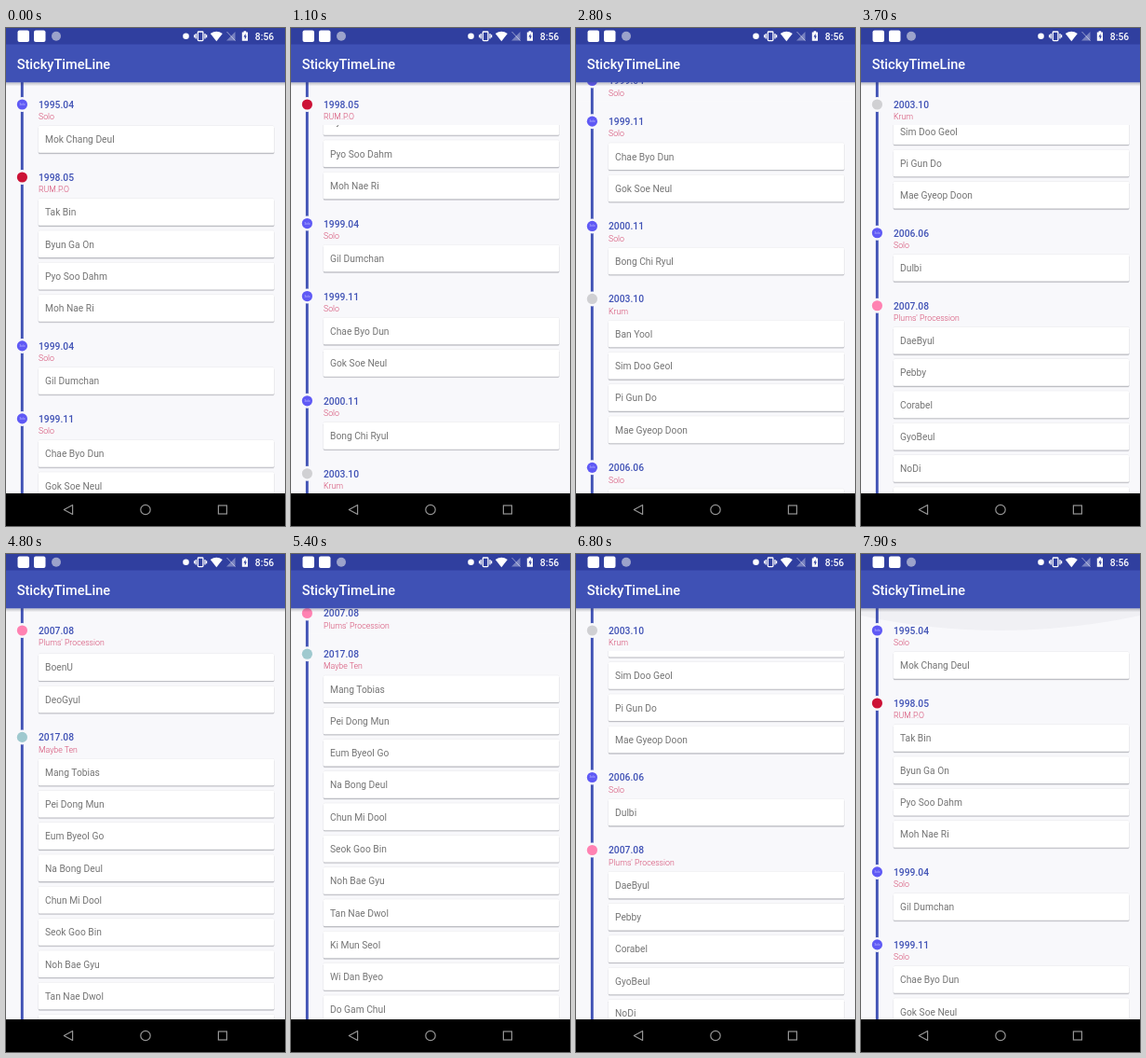
Animation of 300 by 534 pixels, one loop 8 s. Source, as an HTML page:

```html
<!DOCTYPE html>
<html lang="en">
<head>
<meta charset="utf-8">
<title>StickyTimeLine</title>
<style>
  html, body { margin: 0; width: 100%; height: 100%; overflow: hidden; background: #000; }
  svg { display: block; width: 100%; height: 100%; }
  text { font-family: Roboto, sans-serif; }
  .bar { font-size: 14.6px; font-weight: 500; fill: #fff; }
  .clock { font-size: 10.3px; font-weight: 500; fill: #fff; }
  .date { font-size: 10.3px; font-weight: 500; fill: #3f51b5; }
  .group { font-size: 8.75px; font-weight: 300; fill: #d4486f; }
  .name { font-size: 10.25px; fill: #757575; }
  .badge { font-size: 3px; fill: #c9c7ff; text-anchor: middle; }
</style>
</head>
<body>
<svg viewBox="0 0 300 534">
  <defs>
    <linearGradient id="shade" x2="0" y2="1">
      <stop offset="0" stop-color="#30343f" stop-opacity=".3"/>
      <stop offset="1" stop-color="#30343f" stop-opacity="0"/>
    </linearGradient>
  </defs>
  <rect width="300" height="534" fill="#f8f8fb"/>
  <g id="cards"></g>
  <rect id="band" y="58" width="300" fill="#f8f8fb"/>
  <path d="M17.3 58V499" stroke="#3f51b5" stroke-width="2.9"/>
  <g id="heads"></g>
  <path id="glow" d="M0 58V66Q150 98 300 66V58Z" fill="#50546a"/>
  <rect y="58.3" width="300" height="4" fill="url(#shade)"/>

  <rect width="300" height="58.3" fill="#3f51b5"/>
  <rect width="300" height="17.5" fill="#303f9f"/>
  <text class="bar" x="11.7" y="43.5">StickyTimeLine</text>
  <g fill="#fff">
    <rect x="12.5" y="2.5" width="12.5" height="12.5" rx="2"/>
    <rect x="30" y="2.5" width="12.5" height="12.5" rx="2"/>
    <circle cx="54" cy="8.7" r="5" fill="#9ca3cb"/>
    <circle cx="193.5" cy="8.7" r="3.3"/>
    <path d="M226.3 14.2L219.8 5.9Q226.3 1.6 232.8 5.9Z"/>
    <path d="M246.5 4V13.6H237Z" opacity=".35"/>
    <path d="M255.6 3.2h2.6v1.2h1.8v9.4h-6.2V4.4h1.8Z"/>
  </g>
  <path d="M257.6 6L255.4 9.6H256.8V12.4L258.9 8.6H257.6Z" fill="#303f9f"/>
  <g fill="none" stroke="#fff" stroke-width="1.3">
    <rect x="206.3" y="4" width="5.6" height="9.6" rx=".8"/>
    <path d="M204.2 6v5.6M214 6v5.6M202.6 7.3v3M215.6 7.3v3"/>
    <path d="M237.5 4L246.5 13.6" stroke-opacity=".5" stroke-width="1"/>
  </g>
  <text class="clock" x="267.8" y="12.8">8:56</text>

  <rect y="499" width="300" height="35" fill="#000"/>
  <g fill="none" stroke="#959595" stroke-width="1.2">
    <path d="M71.6 511.5V521.5L62.3 516.5Z" stroke-linejoin="round"/>
    <circle cx="150" cy="516.5" r="5.2"/>
    <rect x="228.4" y="512" width="9" height="9"/>
  </g>
</svg>
<script>
const LOOP = 8000, STEP = 100, SWIPE = 900;
const TOP = 82, PITCH = 34.3, HEAD = 43.7;
const VIOLET = '#5f59f5';

const sections = [
  ['1995.04', 'Solo', VIOLET, 'Mok Chang Deul'],
  ['1998.05', 'RUM.P.O', '#cc1236', 'Tak Bin,Byun Ga On,Pyo Soo Dahm,Moh Nae Ri'],
  ['1999.04', 'Solo', VIOLET, 'Gil Dumchan'],
  ['1999.11', 'Solo', VIOLET, 'Chae Byo Dun,Gok Soe Neul'],
  ['2000.11', 'Solo', VIOLET, 'Bong Chi Ryul'],
  ['2003.10', 'Krum', '#d0d0d3', 'Ban Yool,Sim Doo Geol,Pi Gun Do,Mae Gyeop Doon'],
  ['2006.06', 'Solo', VIOLET, 'Dulbi'],
  ['2007.08', "Plums' Procession", '#ff82b2',
    'DaeByul,Pebby,Corabel,GyoBeul,NoDi,MooRyung,BoenU,DeoGyul'],
  ['2017.08', 'Maybe Ten', '#9fc9cf',
    'Mang Tobias,Pei Dong Mun,Eum Byeol Go,Na Bong Deul,Chun Mi Dool,Seok Goo Bin,' +
    'Noh Bae Gyu,Tan Nae Dwol,Ki Mun Seol,Wi Dan Byeo,Do Gam Chul']
];

// Start time and resting scroll of each swipe; the last one overshoots the top
const swipes = [
  [400, 140], [1300, 280], [2600, 555], [3600, 975],
  [4600, 1080], [5500, 914], [6400, 162], [7300, -150]
];

const $ = id => document.getElementById(id);

function add(parent, tag, attrs, text) {
  const el = document.createElementNS('http://www.w3.org/2000/svg', tag);
  for (const k in attrs) el.setAttribute(k, attrs[k]);
  if (text) el.textContent = text;
  return parent.appendChild(el);
}

function addCard(y, name) {
  const box = (dy, h, fill, opacity) => add($('cards'), 'rect',
    { x: 34.8, y: y + dy, width: 253.6, height: h, rx: 1.5, fill, opacity });
  box(-0.5, 31, '#70727c', .12);
  box(1, 28.9, '#70727c', .36);
  box(0, 28.8, '#fff', 1);
  add($('cards'), 'text', { class: 'name', x: 42, y: y + 18.4 }, name);
}

function addHead(date, group, color) {
  const g = add($('heads'), 'g', {});
  add(g, 'circle', { cx: 17.4, r: 8, fill: '#f8f8fb' });
  add(g, 'circle', { cx: 17.4, r: 5.6, fill: color });
  if (group === 'Solo') add(g, 'text', { class: 'badge', x: 17.4, y: 1 }, group);
  add(g, 'text', { class: 'date', x: 35, y: 4 }, date);
  add(g, 'text', { class: 'group', x: 35, y: 16.3 }, group);
  return g;
}

let y = TOP;
const heads = sections.map(([date, group, color, list]) => {
  const names = list.split(','), head = { y, el: addHead(date, group, color) };
  names.forEach((name, i) => addCard(y + 23 + i * PITCH, name));
  y += HEAD + names.length * PITCH;
  return head;
});

// Finger drag picks up speed, then the fling dies away
const fling = u => 1 - (1 - u * u) ** 3;

function scrollAt(t) {
  return swipes.reduce((pos, [start, to]) => {
    const u = Math.min(1, Math.max(0, (t - start) / SWIPE));
    return pos + (to - pos) * fling(u);
  }, 0);
}

function draw(t) {
  const raw = scrollAt(t), s = Math.max(0, raw);
  $('cards').setAttribute('transform', `translate(0 ${-s})`);
  const cur = heads.filter(h => h.y - s <= TOP).length - 1;
  const next = heads[cur + 1];
  const pinned = next ? Math.min(TOP, next.y - s - HEAD) : TOP;
  heads.forEach((h, i) =>
    h.el.setAttribute('transform', `translate(0 ${i === cur ? pinned : h.y - s})`));
  $('band').setAttribute('height', Math.max(0, pinned + 22 - 58));
  $('glow').setAttribute('opacity', (s - raw) / 2000);
}

const start = performance.now();
function tick() {
  const t = (performance.now() - start) % LOOP;
  draw(Math.floor(t / STEP) * STEP);
  requestAnimationFrame(tick);
}
tick();
</script>
</body>
</html>
```
